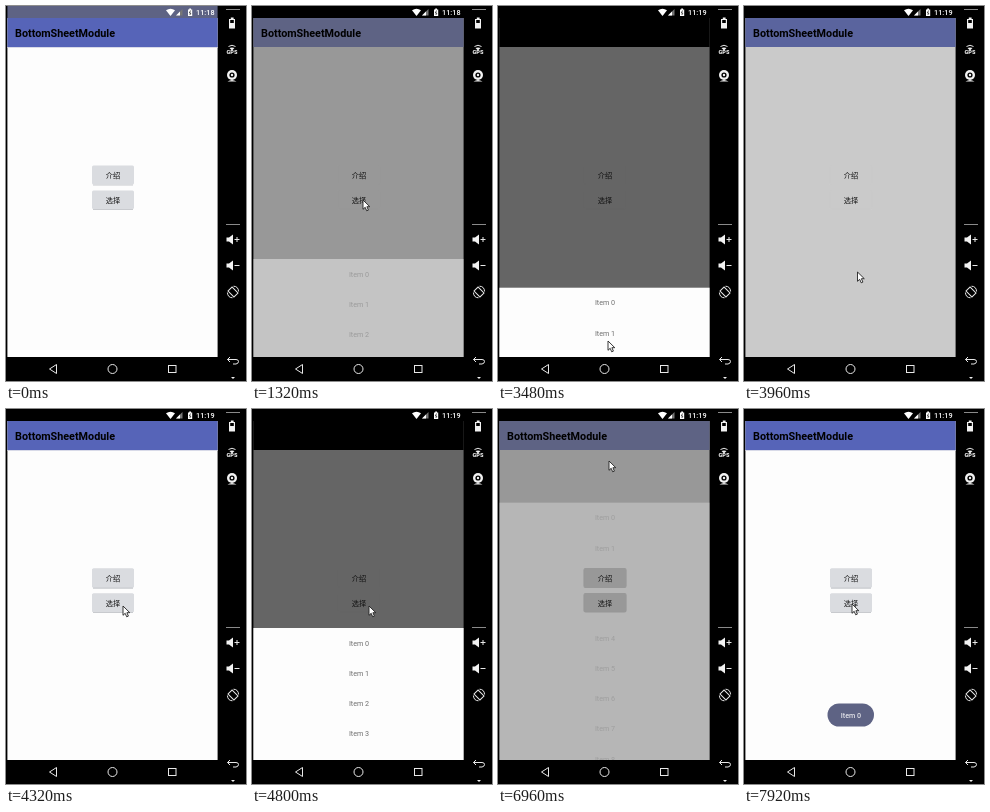
An HTML page for the animation above (8 s loop, 240 px wide and 375 px high).

```html
<!DOCTYPE html>
<html lang="zh">
<head>
<meta charset="utf-8">
<title>BottomSheetModule</title>
<style>
html, body { margin: 0; width: 100%; height: 100%; overflow: hidden; background: #000; }
svg { display: block; width: 100%; height: 100%; }
text { font-family: Roboto, "Noto Sans CJK SC", "Noto Sans CJK", sans-serif; }
.mid { text-anchor: middle; font-size: 7.2px; }
.line { fill: none; stroke: #e8e8e8; stroke-width: 1; }
</style>
</head>
<body>
<svg viewBox="0 0 240 375" xmlns="http://www.w3.org/2000/svg">
  <defs>
    <clipPath id="screen"><rect x="1.4" y="0" width="210.2" height="351"/></clipPath>
  </defs>
  <rect width="240" height="375" fill="#000"/>

  <g clip-path="url(#screen)">
    <rect id="page" x="1" y="12" width="211" height="339"/>
    <g id="buttons">
      <g id="faces" stroke-width="1.2">
        <rect x="86" y="159.5" width="42" height="19" rx="1.5"/>
        <rect x="86" y="184.5" width="42" height="18.5" rx="1.5"/>
      </g>
      <path id="edges" d="M87 179H127M87 203.5H127" stroke="#c8cace" stroke-width="1"/>
      <g class="mid" font-weight="500" fill="#111">
        <text x="107" y="171.5">介绍</text>
        <text x="107" y="196.5">选择</text>
      </g>
    </g>
    <rect id="bar" x="1" y="12" width="211" height="29"/>
    <rect id="shade" x="1" y="41" width="211" height="1" fill="#d8dae8"/>
    <text x="9" y="30.7" font-size="10.8" font-weight="700">BottomSheetModule</text>
    <g id="sheet">
      <rect x="1" width="211" height="340" fill="#fdfdfd"/>
      <g id="items" class="mid" fill="#707070"></g>
    </g>
    <use id="over" href="#buttons"/>
    <g id="toast">
      <rect x="83.5" y="294.5" width="46.5" height="23" rx="11.5" fill="#5e6384"/>
      <text class="mid" x="107" y="308.7" font-weight="500" fill="#e4e4ea">Item 0</text>
    </g>
    <rect id="status" x="1" y="0" width="211" height="12"/>
    <g fill="#fff">
      <path d="M160 4.3Q164.5 1.2 169 4.3L164.5 10Z"/>
      <path d="M176.5 3V9.5H170Z" fill="#777"/>
      <path d="M174 5.5V9.5H170Z"/>
      <path d="M182 3.5H183.2V2.5H185V3.5H186.2V10H182Z"/>
      <path d="M184.6 4.5L183.3 7H184.9L183.8 9" fill="none" stroke="#333" stroke-width=".8"/>
      <text id="clock" x="190" y="9.2" font-size="7.3" font-weight="500"></text>
    </g>
  </g>

  <g class="line">
    <path d="M50.5 358.5V367.5L43.5 363Z"/>
    <circle cx="106.5" cy="363" r="4.5"/>
    <rect x="162.5" y="359.5" width="7.5" height="7"/>
  </g>

  <g id="tools" fill="#f2f2f2">
    <path d="M220 3.5H234M220 218.5H234" stroke="#8a8a8a"/>
    <path d="M223 13H224.8V11.5H227.6V13H229V22.5H223Z"/>
    <rect x="224.2" y="14" width="3.6" height="3" fill="#000"/>
    <path d="M222.5 40.5Q226 38 229.5 40.5" class="line"/>
    <path d="M223.5 42Q226 40.8 228.5 42L226 44.5Z"/>
    <text x="226" y="48.3" text-anchor="middle" font-size="5.6" font-weight="900">GPS</text>
    <circle cx="226" cy="69" r="5"/>
    <circle cx="226" cy="69" r="2.6" fill="#000"/>
    <circle cx="226" cy="69" r="1.2"/>
    <path d="M221.5 75.5Q226 72.5 230.5 75.5Z"/>
    <path id="speaker" d="M220.5 231.5H223L227 228.5V238.5L223 235.5H220.5Z"/>
    <use href="#speaker" y="26"/>
    <path class="line" d="M228.5 233.5H233.5M231 231V236M228.5 259.5H233.5"/>
    <g class="line" transform="translate(227 286)">
      <rect x="-2.9" y="-4.2" width="5.8" height="8.4" transform="rotate(-45)"/>
      <path d="M.5 -5.8Q5.3 -5.6 5.6 -.5M-.5 5.8Q-5.3 5.6 -5.6 .5"/>
    </g>
    <path class="line" d="M224 351L221.5 353.5L224 356M221.5 353.5H230Q232.5 353.5 232.5 355.5T230 358H227"/>
    <path d="M225 371H229L227 373Z"/>
  </g>

  <path id="cursor" d="M0 0V9.3L2.2 7.3L3.7 10.8L5.4 10.1L3.9 6.7H6.8Z" fill="#fff" stroke="#222" stroke-width=".9"/>
</svg>
<script>
const LOOP = 8000, STEP = 120, FADE = 360;
const REST = 219, ROW = 30.15;

// The sheet opens twice: dragged down and dropped, then pulled up and dismissed.
// lag is how long the status bar stays tinted after closing.
const visits = [
  { open: 1080, close: 3720, drag: [3000, 3600], by: 70, lag: 240 },
  { open: 4440, close: 6840, drag: [5280, 5930], by: -182, lag: 720 }
];
// Pointer moves: from, to, x, y.
const moves = [
  [120, 720, 111, 194], [1680, 2400, 117, 243], [2520, 3480, 110, 335],
  [3600, 4320, 117, 197], [4920, 5760, 139, 62], [5760, 6120, 133, 84],
  [6120, 6600, 111, 52], [7080, 7440, 105, 354], [7440, 7680, 108, 195]
];

const $ = id => document.getElementById(id);
const set = (id, attrs) => {
  for (const key in attrs) $(id).setAttribute(key, attrs[key]);
};
const show = (id, on) => set(id, { display: on ? 'inline' : 'none' });
const mix = (a, b, p) => a + (b - a) * p;
const rgb = c => `rgb(${c.map(Math.round)})`;
const ramp = (t, from, to) => Math.min(1, Math.max(0, (t - from) / (to - from)));
const ease = (t, from, to) => {
  const p = ramp(t, from, to);
  return p * p * (3 - 2 * p);
};

function pointer(t) {
  let x = 159, y = 131;
  for (const [from, to, nextX, nextY] of moves) {
    const p = ease(t, from, to);
    x = mix(x, nextX, p);
    y = mix(y, nextY, p);
  }
  return [x, y];
}

function barColor(dim) {
  const blue = [86, 100, 184], slate = [94, 99, 132];
  return dim > .5 ? '#000' : rgb(blue.map((v, i) => mix(v, slate[i], dim / .4)));
}

for (let i = 0; i < 11; i++) {
  const label = document.createElementNS('http://www.w3.org/2000/svg', 'text');
  set('items', {});
  label.setAttribute('x', 107);
  label.setAttribute('y', 17.7 + i * ROW);
  label.textContent = 'Item ' + i;
  $('items').append(label);
}

function draw(ms) {
  const t = Math.floor(ms / STEP) * STEP;
  const visit = t < visits[1].open ? visits[0] : visits[1];
  const { open, close, drag, by, lag } = visit;
  const shown = ramp(t, open, open + FADE);
  const gone = ramp(t, close, close + FADE);
  const dim = .6 * (shown - gone);
  const alpha = shown ** 2 * (1 - gone) ** 3;
  const top = REST + by * ease(t, ...drag) + 102 * (1 - shown) + 170 * gone;

  const grey = 253 * (1 - dim), page = rgb([grey, grey, grey]);
  const face = dim ? page : '#dadce0';
  const tinted = t <= visits[0].open || (gone === 1 && t < close + FADE + lag);
  const [x, y] = pointer(t);

  set('page', { fill: page });
  set('faces', { fill: face, stroke: dim ? page : 'none' });
  show('edges', !dim);
  show('shade', !dim);
  set('bar', { fill: barColor(dim) });
  set('status', { fill: tinted ? '#5e6384' : '#000' });
  set('sheet', { transform: `translate(0 ${top})`, opacity: alpha });
  set('items', { opacity: Math.sqrt(alpha) });
  show('over', gone > 0);
  set('toast', { opacity: ramp(t, 6960, 7320) });
  $('clock').textContent = t < 3360 ? '11:18' : '11:19';
  show('cursor', t >= 120);
  set('cursor', { transform: `translate(${x} ${y})` });
}

const start = performance.now();
function tick() {
  draw((performance.now() - start) % LOOP);
  requestAnimationFrame(tick);
}
tick();
</script>
</body>
</html>
```
